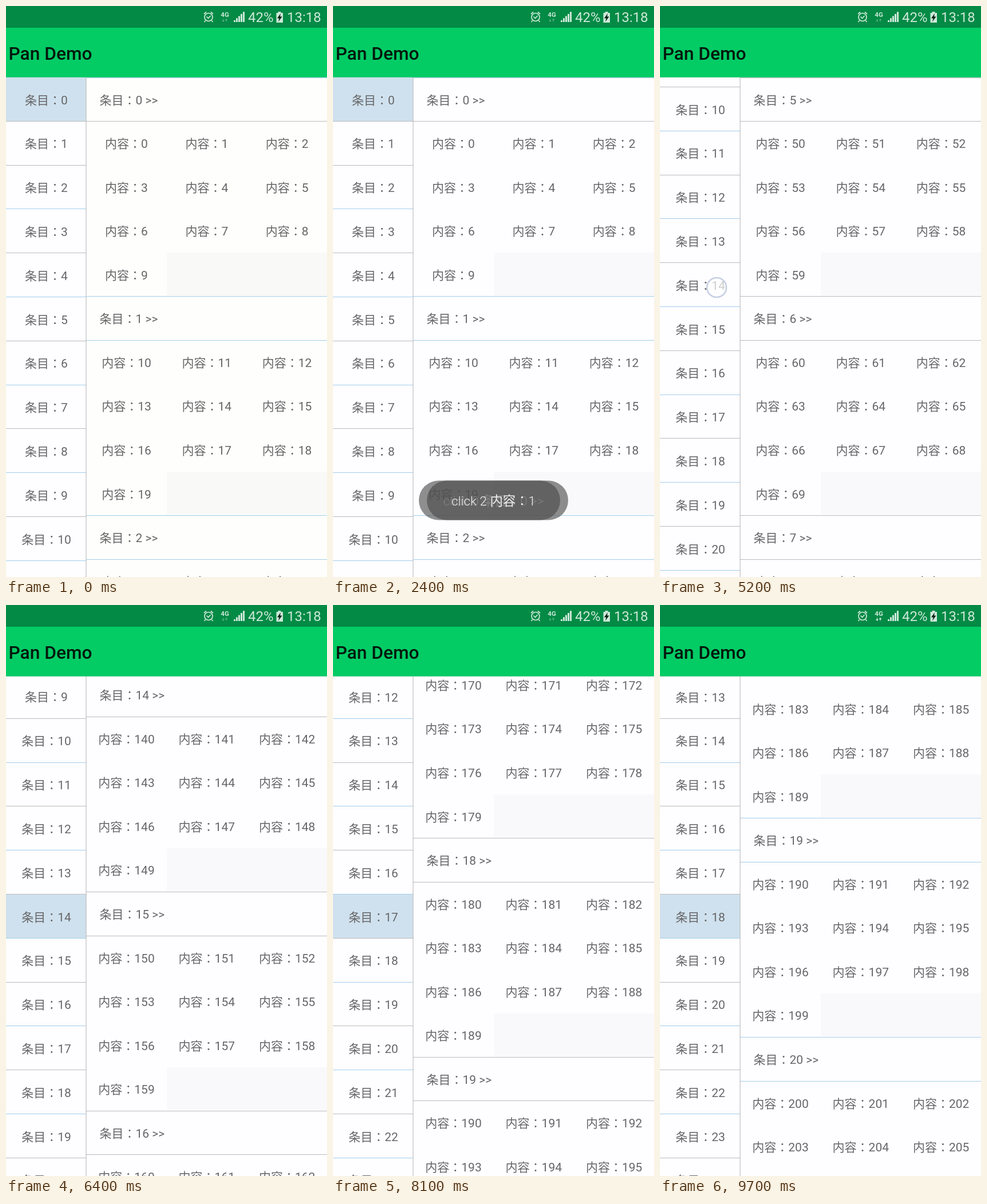
These frames come from a looping animation (561 by 998 pixels, 9800 ms). An HTML page with a canvas:

```html
<!DOCTYPE html>
<html lang="ja">
<head>
<meta charset="utf-8">
<title>Pan Demo</title>
<style>
  html, body { margin: 0; width: 100%; height: 100%; overflow: hidden; }
  canvas { display: block; }
</style>
</head>
<body>
<canvas id="stage" width="561" height="998"></canvas>
<script>
const ctx = document.getElementById('stage').getContext('2d');
const LOOP = 9800, STEP = 100;
const TOP = 125, SPLIT = 140, WIDTH = 561, HEIGHT = 998;
const ITEM = 76.8, ROW = 76.56, SECTION = ROW * 5;
const FONTS = 'Roboto, "Noto Sans CJK JP", "Noto Sans CJK TC", sans-serif';
const GREY = '#bbbbbc', BLUE = '#a2cfec', PALE = '#cde8d9';

const clamp = x => Math.max(0, Math.min(1, x));
const ramp = (t, start, length) => clamp((t - start) / length);

function track(t, keys) {
  const i = keys.findIndex(k => k[0] > t);
  if (i === 0) return keys[0][1];
  if (i < 0) return keys[keys.length - 1][1];
  const [t0, v0] = keys[i - 1], [t1, v1] = keys[i];
  return v0 + (v1 - v0) * (t - t0) / (t1 - t0);
}

function box(x, y, w, h, color) {
  ctx.fillStyle = color;
  ctx.fillRect(x, y, w, h);
}

function text(str, x, y, { size = 21, weight = 400, color = '#666567', align = 'left' } = {}) {
  ctx.font = `${weight} ${size}px ${FONTS}`;
  ctx.textAlign = align;
  ctx.fillStyle = color;
  ctx.fillText(str, x, y);
}

// Motion

function contentScroll(t) {
  if (t < 3200) return 0;
  if (t < 5400) return 5 * SECTION;
  if (t < 7000) return track(t, [[6200, 14 * SECTION], [6900, 14 * SECTION + 22], [7000, 5436]]);
  return 7025.5 - 126 * ((9700 - t) / 1000) ** 2.55;   // decelerating fling
}

const selected = t => Math.floor(contentScroll(t) / SECTION + 1e-6);
const centred = item => Math.max(0, item * ITEM - 381);

function menuScroll(t) {
  if (t < 3400) return centred(selected(t));
  if (t < 5400) return track(t, [[3400, 3], [3600, 90], [3800, 270], [4100, 528.6],
    [4400, 660], [4700, 730], [5000, 751]]);
  return centred(selected(t < 7000 ? t : t - 80));   // the menu trails the content
}

const touches = [
  { from: 1200, to: 1400, x: 205, y: () => 166 },
  { from: 2100, to: 2300, x: 352, y: () => 243 },
  { from: 3000, to: 3200, x: 82, y: () => 549 },
  { from: 3400, to: 3700, x: 90, y: t => 760 - menuScroll(t) },
  { from: 5100, to: 5300, x: 99, y: () => 492 },
  { from: 6700, to: 7000, x: 350, y: t => 700 + 14 * SECTION - contentScroll(t) }
];

// Drawing

function drawMenu(t) {
  const scroll = menuScroll(t), current = selected(t);
  const first = Math.floor(scroll / ITEM);
  box(0, TOP, SPLIT, HEIGHT - TOP, '#fefdff');
  for (let i = first; i < first + 13; i++) {
    const y = TOP + i * ITEM - scroll;
    if (i === current) box(0, Math.floor(y), SPLIT, ITEM, '#cfe1ee');
    box(0, Math.floor(y + ITEM - 0.5), SPLIT, 1, i > 0 && i % 2 === 0 ? BLUE : GREY);
    text('条目：' + i, 70.5, Math.round(y + 46.5), { align: 'center' });
  }
}

function drawContent(t) {
  const scroll = contentScroll(t), warm = t < 1200;
  const first = Math.floor(scroll / SECTION + 1e-6);
  const line = scroll < 1 || first >= 18 ? BLUE : GREY;
  box(SPLIT, TOP, WIDTH - SPLIT, HEIGHT - TOP, warm ? '#fefefc' : '#fefdff');
  for (let s = first; s < first + 4; s++) {
    const y = TOP + s * SECTION - scroll;
    box(281, Math.round(y + 4 * ROW), 280, 75, warm ? '#f9f9f7' : '#f9f8fa');
    box(SPLIT, Math.floor(y), WIDTH - SPLIT, 1, line);
    box(SPLIT, Math.floor(y + ROW), WIDTH - SPLIT, 1, s === 0 ? GREY : line);
    text(`条目：${s} >>`, 163.5, Math.round(y + 46.5));
    for (let n = 0; n < 10; n++) {
      text('内容：' + (s * 10 + n), 210.5 + 140.3 * (n % 3),
        Math.round(y + (1 + Math.floor(n / 3)) * ROW + 46.5), { align: 'center' });
    }
  }
  box(SPLIT - 0.5, TOP, 1, HEIGHT - TOP, '#b4b4b6');
}

function drawAlarm() {
  ctx.strokeStyle = PALE;
  ctx.lineWidth = 1.7;
  ctx.beginPath();
  ctx.arc(354, 19.5, 7, 0, 7);
  ctx.moveTo(346, 14); ctx.lineTo(350, 10.5);
  ctx.moveTo(362, 14); ctx.lineTo(358, 10.5);
  ctx.moveTo(348.5, 25.5); ctx.lineTo(346.5, 28);
  ctx.moveTo(359.5, 25.5); ctx.lineTo(361.5, 28);
  ctx.moveTo(350.5, 18.5); ctx.lineTo(353.5, 21.5); ctx.lineTo(357.5, 17);
  ctx.stroke();
}

function drawArrow(x, y, dir) {
  ctx.beginPath();
  ctx.moveTo(x, y + 3 * dir);
  ctx.lineTo(x - 2.5, y);
  ctx.lineTo(x + 2.5, y);
  ctx.fill();
  ctx.fillRect(x - 0.6, y - 2.5, 1.2, 5);
}

function drawBars(t) {
  box(0, 0, WIDTH, 38, '#038a45');
  box(0, 38, WIDTH, TOP - 38, '#03cc65');
  box(0, TOP - 1, WIDTH, 1, '#4cc98a');
  text('Pan Demo', 4.5, 93.5, { size: 31.7, weight: 500, color: '#03190d' });

  drawAlarm();
  text('4G', 382.5, 19, { size: 11.5, weight: 700, color: PALE, align: 'center' });
  ctx.fillStyle = t >= 9700 ? PALE : '#4fae7c';
  drawArrow(379.5, 25, 1);
  drawArrow(385, 25, -1);
  for (let i = 0; i < 5; i++) {
    const h = 3 + i * 3.7;
    box(398 + i * 4, 28 - h, 3, h, PALE);
  }
  text('42%', 423, 28, { size: 24, color: PALE });
  box(475.5, 10, 5, 3, PALE);
  box(472.5, 12, 11.5, 17, PALE);
  ctx.fillStyle = '#06210f';
  ctx.beginPath();
  for (const [x, y] of [[480, 13], [474, 21.5], [477.5, 21.5], [476, 27.5], [482.5, 18.5], [479, 18.5]])
    ctx.lineTo(x, y);
  ctx.fill();
  text('13:18', 491, 28, { size: 24, color: PALE });
}

function drawToast(str, halfWidth, alpha) {
  if (alpha <= 0) return;
  ctx.globalAlpha = alpha;
  ctx.fillStyle = 'rgba(80,80,80,.77)';
  ctx.beginPath();
  ctx.roundRect(280.5 - halfWidth, 829.5, halfWidth * 2, 69, 34.5);
  ctx.fill();
  text(str, 280.5, 873, { size: 22.4, weight: 300, color: '#fff', align: 'center' });
  ctx.globalAlpha = 1;
}

function drawTouch(x, y) {
  ctx.beginPath();
  ctx.arc(x, y, 17, 0, 7);
  ctx.fillStyle = 'rgba(255,255,255,.68)';
  ctx.fill();
  ctx.lineWidth = 2.6;
  ctx.strokeStyle = '#c6d0e3';
  ctx.stroke();
}

function draw(t) {
  drawMenu(t);
  drawContent(t);
  drawBars(t);
  drawToast('click 0 条目：0 >>', 130.5, ramp(t, 1400, 300) - ramp(t, 2350, 300));
  drawToast('click 2 内容：1', 116.5, ramp(t, 2130, 300) - ramp(t, 3500, 300));
  for (const touch of touches)
    if (t >= touch.from && t < touch.to) drawTouch(touch.x, touch.y(t));
}

const start = performance.now();
function tick() {
  const t = (performance.now() - start) % LOOP;
  draw(Math.floor(t / STEP) * STEP);
  requestAnimationFrame(tick);
}
tick();
</script>
</body>
</html>
```
